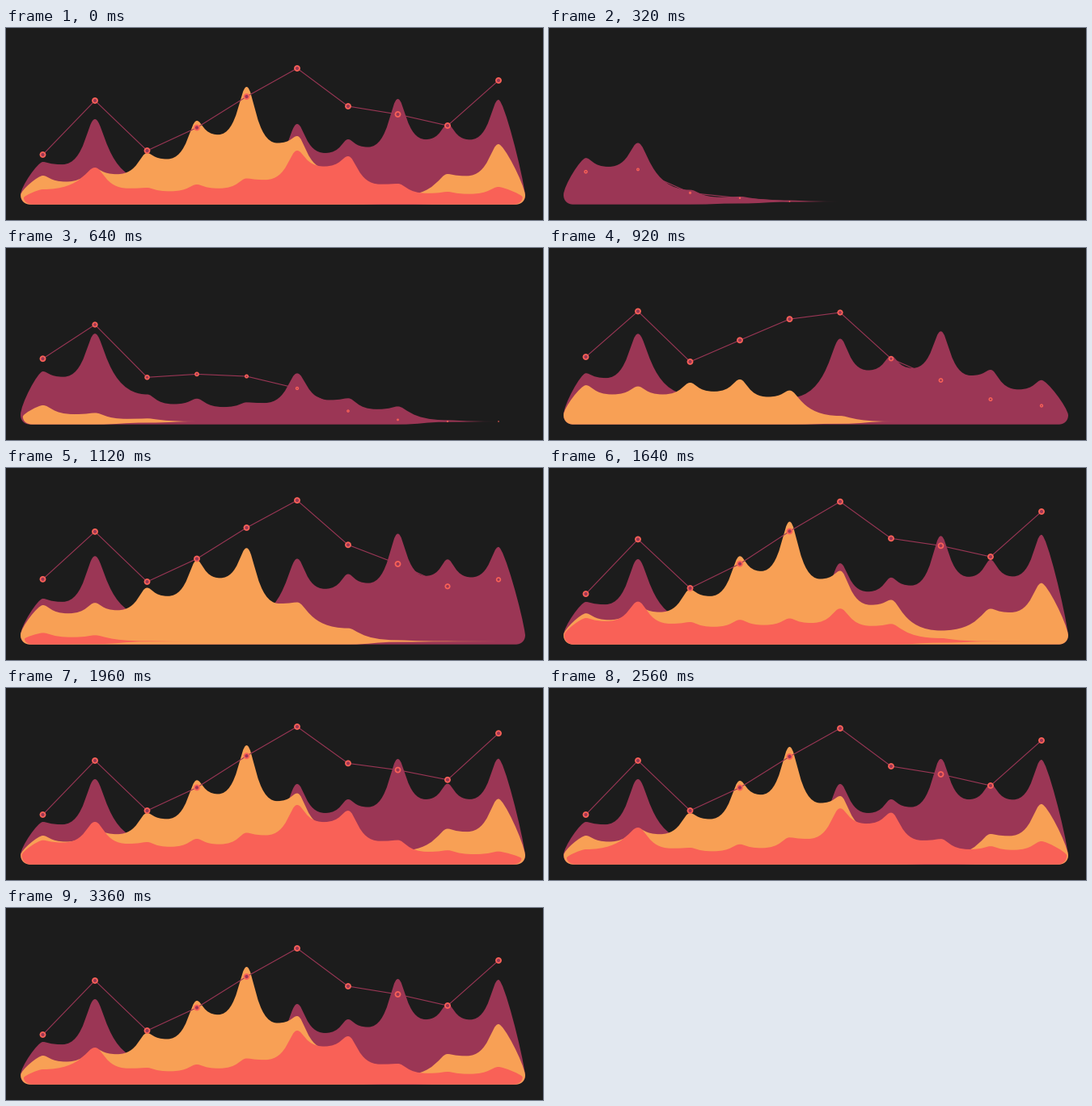
Animation, 664 px wide and 238 px high, one loop 4.36 s. Source, as a matplotlib script:

```python
import numpy as np
import matplotlib.pyplot as plt
from matplotlib.animation import FuncAnimation
from matplotlib.patches import Circle, PathPatch
from matplotlib.path import Path

W, H, DPI = 664, 238, 100
STEP, LOOP, END = 40, 4360, 3360
BG, PLUM, ORANGE, CORAL = "#1c1c1c", "#9b3655", "#f8a055", "#f96157"
FLAT, FLOOR = 215, 218.7
PX = 72 / DPI
XS = np.array([45.5, 110, 174.5, 236, 297.5, 360, 423, 484.5, 546, 609])
IDX = np.arange(len(XS))
LAG = 88  # ms between neighbouring points


def smooth(u):
    u = np.clip(u, 0, 1)
    return u * u * (3 - 2 * u)


class Wave:
    """Points rise past their rest height one after another, then settle."""

    def __init__(self, rest, rise, settle, lift, rise_ms=550, settle_ms=550):
        self.height = FLAT - np.array(rest, float)
        self.rise, self.settle = rise + LAG * IDX, settle + LAG * IDX
        self.rise_ms, self.settle_ms = rise_ms, settle_ms
        self.lift = lift * (1 + np.exp(-3.0 * IDX))

    def at(self, t):
        up = smooth(0.5 + (t - self.rise) / self.rise_ms)
        extra = 1 - smooth(0.5 + (t - self.settle) / self.settle_ms)
        return FLAT - up * (self.height + self.lift * extra)


plum = Wave([166, 113, 188, 192, 192, 119, 138, 88, 119, 89], 170, 1050, 6.5)
orange = Wave([183, 174, 155, 115, 73, 134, 170, 208, 181, 144], 660, 1530, 6.5)
coral = Wave([200, 173, 198, 194, 186.5, 152, 159, 193, 203, 197], 1170, 2080, 7)
dots = Wave([157, 90, 152, 123.5, 85, 50, 97, 107, 121, 65],
            340, 1340, 11, rise_ms=750, settle_ms=800)


def slope(p, q, crest, foot):
    """Bezier from p to q: tight at the crest, wide at the foot."""
    a, b = (crest, foot) if p[1] < q[1] else (foot, crest)
    dx = q[0] - p[0]
    return [(p[0] + a * dx, p[1]), (q[0] - b * dx, q[1]), tuple(q)]


def span(p, q):
    """Curve between two points, sagging when they are of similar height."""
    hp, hq = FLOOR - p[1], FLOOR - q[1]
    low, ratio = min(hp, hq), min(hp, hq) / max(hp, hq)
    sag = low * np.clip(0.5 * (ratio - 0.38), 0, 0.21)
    if low < 6 or sag < 0.3:
        return slope(p, q, 0.17, 0.78)
    f = 0.25 + 0.25 * ratio
    if hq < hp:
        f = 1 - f
    dip = (p[0] + f * (q[0] - p[0]), FLOOR - low + sag)
    return slope(p, dip, 0.24, 0.71) + slope(dip, q, 0.24, 0.71)


def side(y):
    """Inset of the outer edge, height of its foot and corner width."""
    h = FLAT - y
    return 18 + max(0, 33 - h) * 0.22, FLAT - min(8, 0.3 * h), min(12, h)


def hill(ys):
    lx, lfoot, lw = side(ys[0])
    rx, rfoot, rw = side(ys[-1])
    rx = 660 - rx
    tops = list(zip(XS, ys))
    under = FLAT + (FLOOR - FLAT) * np.clip((FLAT - ys) / 9, 0, 1)

    v = [(lx, lfoot), (lx, lfoot - 0.25 * (lfoot - ys[0])),
         (XS[0] - 0.22 * (XS[0] - lx), ys[0]), tops[0]]
    for p, q in zip(tops, tops[1:]):
        v += span(p, q)
    v += [(XS[-1] + 0.2 * (rx - XS[-1]), ys[-1]),
          (rx - 0.03 * (FLAT - ys[-1]), rfoot - 0.25 * (rfoot - ys[-1])),
          (rx, rfoot)]
    v += [(rx, rfoot + 0.6 * (under[-1] - rfoot)), (rx - 0.4 * rw, under[-1]),
          (rx - rw, under[-1])]
    base = [(rx - rw, under[-1])] + list(zip(XS, under))[::-1]
    base.append((lx + lw, under[0]))
    for p, q in zip(base, base[1:]):
        v += slope(p, q, 0.5, 0.5)
    v += [(lx + 0.4 * lw, under[0]), (lx, lfoot + 0.6 * (under[0] - lfoot)),
          (lx, lfoot)]
    return Path(v, [Path.MOVETO] + [Path.CURVE4] * (len(v) - 1))


fig = plt.figure(figsize=(W / DPI, H / DPI), dpi=DPI, facecolor=BG)
ax = fig.add_axes([0, 0, 1, 1])
ax.set_xlim(0, W)
ax.set_ylim(H, 0)
ax.axis("off")

layers = []
for z, (wave, color) in enumerate([(plum, PLUM), (orange, ORANGE), (coral, CORAL)]):
    patch = PathPatch(hill(wave.at(END)), fc=color, ec="none", lw=0, zorder=z)
    layers.append((ax.add_patch(patch), wave))
segments = [ax.plot([], [], color=PLUM, lw=1.1 * PX, zorder=5)[0] for _ in XS[1:]]
rings = [ax.add_patch(Circle((x, FLAT), 3, fc=PLUM, ec=CORAL, zorder=6)) for x in XS]


def draw(i):
    t = END if i == 0 else min(i * STEP, END)
    for patch, wave in layers:
        ys = wave.at(t)
        patch.set_visible(bool(ys.min() < FLAT - 0.2))
        patch.set_path(hill(ys))

    ys = dots.at(t)
    size = np.clip((t + 120 - 70 * IDX) / 750, 0, 1) * min(1, t / 200)
    for k, ring in enumerate(rings):
        width = 0.8 + size[k]
        ring.center = XS[k], ys[k]
        ring.set_radius(max(0.3, 3.9 * size[k] - width / 2))
        ring.set_linewidth(width * PX)
        ring.set_visible(bool(size[k] > 0.12))
    for k, seg in enumerate(segments):
        seg.set_data(XS[k:k + 2], ys[k:k + 2])
        seg.set_visible(bool(size[k + 1] > 0.2 and ys[k:k + 2].min() < FLAT - 1))
    return [p for p, _ in layers] + segments + rings


anim = FuncAnimation(fig, draw, frames=LOOP // STEP, interval=STEP,
                     init_func=lambda: draw(0), repeat=True, repeat_delay=0)
plt.show()
```
